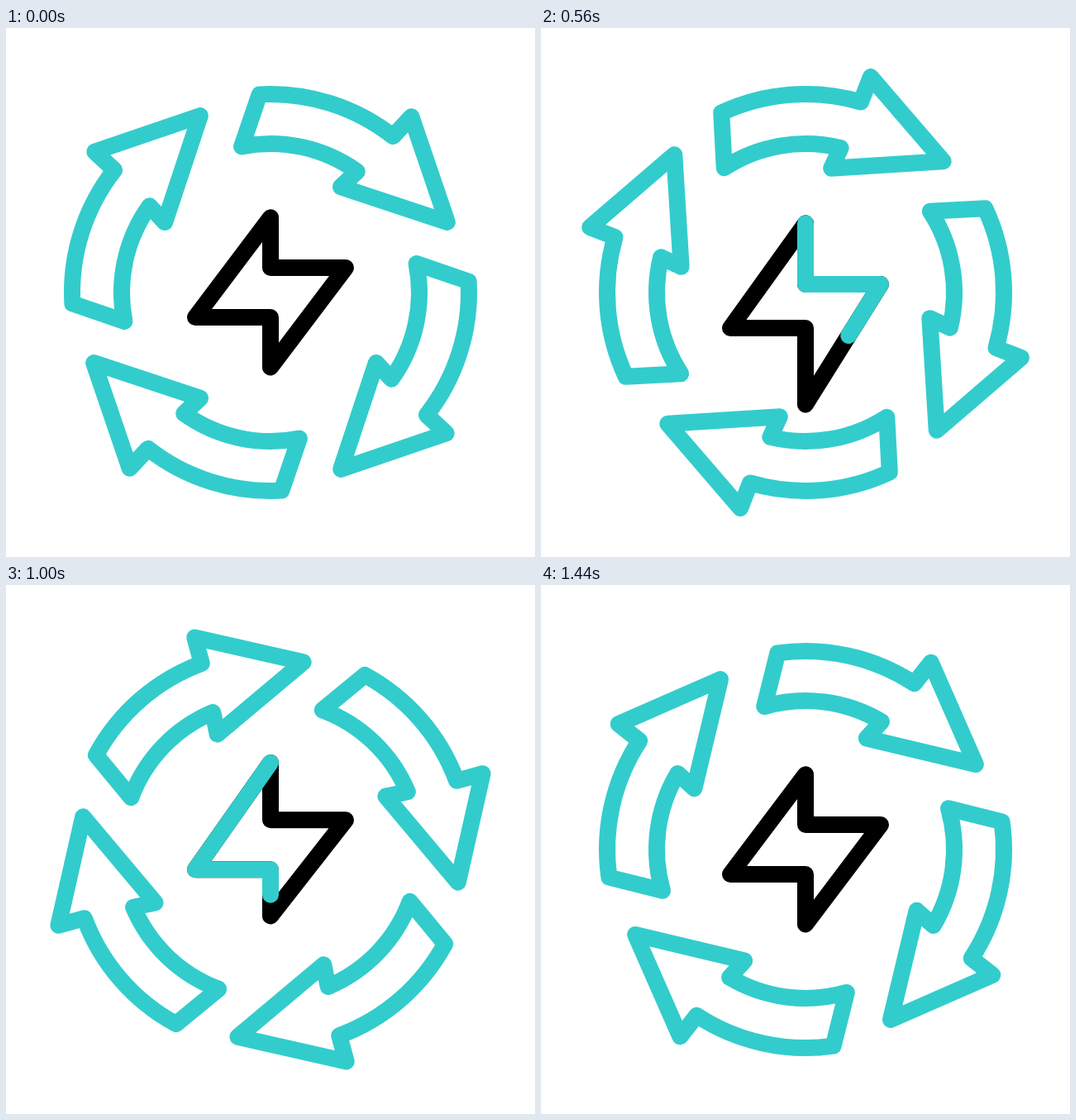
These frames come from a looping animation (640 px wide and 640 px high, 1480 ms). An HTML page with a canvas:

```html
<!DOCTYPE html>
<html lang="en">
<head>
<meta charset="utf-8">
<title>Renewable energy</title>
<style>
  html, body { margin: 0; width: 100%; height: 100%; overflow: hidden; background: #fff; }
  canvas { display: block; width: 640px; height: 640px; }
</style>
</head>
<body>
<canvas id="stage" width="640" height="640"></canvas>
<script>
const ctx = document.getElementById('stage').getContext('2d');
const LOOP = 1480, STEP = 40;
const TEAL = '#33cccc', BLACK = '#000';
const RAD = Math.PI / 180;

// Vertical offsets of the bolt's top, upper bar, lower bar and bottom.
const BOLT_KEYS = [
  [0, [0, 0, 0, 0]],
  [320, [-26, -14, -14, -20]],
  [560, [7, 20, 13, 45]],
  [880, [-28.5, -11.5, -11.5, -20]],
  [1120, [0, 0, 0, 0]]
];

function ease(t, from, to) {
  const u = Math.min(1, Math.max(0, (t - from) / (to - from)));
  return u * u * (3 - 2 * u);
}

function boltOffsets(t) {
  for (let i = 1; i < BOLT_KEYS.length; i++) {
    const [t0, a] = BOLT_KEYS[i - 1], [t1, b] = BOLT_KEYS[i];
    if (t <= t1) {
      const k = ease(t, t0, t1);
      return a.map((v, j) => v + (b[j] - v) * k);
    }
  }
  return [0, 0, 0, 0];
}

function polarLine(r, deg) {
  ctx.lineTo(r * Math.cos(deg * RAD), r * Math.sin(deg * RAD));
}

function drawArrow() {
  ctx.beginPath();
  ctx.arc(0, 0, 240, -93.2 * RAD, -51.9 * RAD);
  polarLine(272.5, -51.3);
  polarLine(230.2, -21.7);
  polarLine(153.5, -56.4);
  polarLine(180, -54.4);
  ctx.arc(0, 0, 180, -54.4 * RAD, -101.2 * RAD, true);
  ctx.closePath();
  ctx.stroke();
}

function drawArrows(t) {
  ctx.strokeStyle = TEAL;
  ctx.save();
  ctx.translate(320, 320);
  ctx.rotate(Math.PI * t / LOOP);
  for (let i = 0; i < 4; i++) {
    drawArrow();
    ctx.rotate(Math.PI / 2);
  }
  ctx.restore();
}

function drawBolt(t) {
  const [top, upper, lower, bottom] = boltOffsets(t);
  const points = [
    [320, 229.3 + top], [320, 290 + upper], [411, 290 + upper],
    [320, 410.5 + bottom], [320, 350 + lower], [229, 350 + lower]
  ];
  ctx.beginPath();
  points.forEach(p => ctx.lineTo(...p));
  ctx.closePath();
  ctx.strokeStyle = BLACK;
  ctx.stroke();

  const start = ease(t, 640, 1320), end = ease(t, 320, 920);
  if (end <= start) return;
  const length = points.reduce((sum, [x, y], i) => {
    const [nx, ny] = points[(i + 1) % points.length];
    return sum + Math.hypot(nx - x, ny - y);
  }, 0);
  ctx.setLineDash([(end - start) * length, length]);
  ctx.lineDashOffset = -start * length;
  ctx.strokeStyle = TEAL;
  ctx.stroke();
  ctx.setLineDash([]);
}

function draw(t) {
  ctx.fillStyle = '#fff';
  ctx.fillRect(0, 0, 640, 640);
  ctx.lineWidth = 20;
  ctx.lineCap = ctx.lineJoin = 'round';
  drawArrows(t);
  drawBolt(t);
}

const origin = performance.now();
function tick() {
  const t = (performance.now() - origin) % LOOP;
  draw(Math.floor(t / STEP) * STEP);
  requestAnimationFrame(tick);
}
tick();
</script>
</body>
</html>
```
